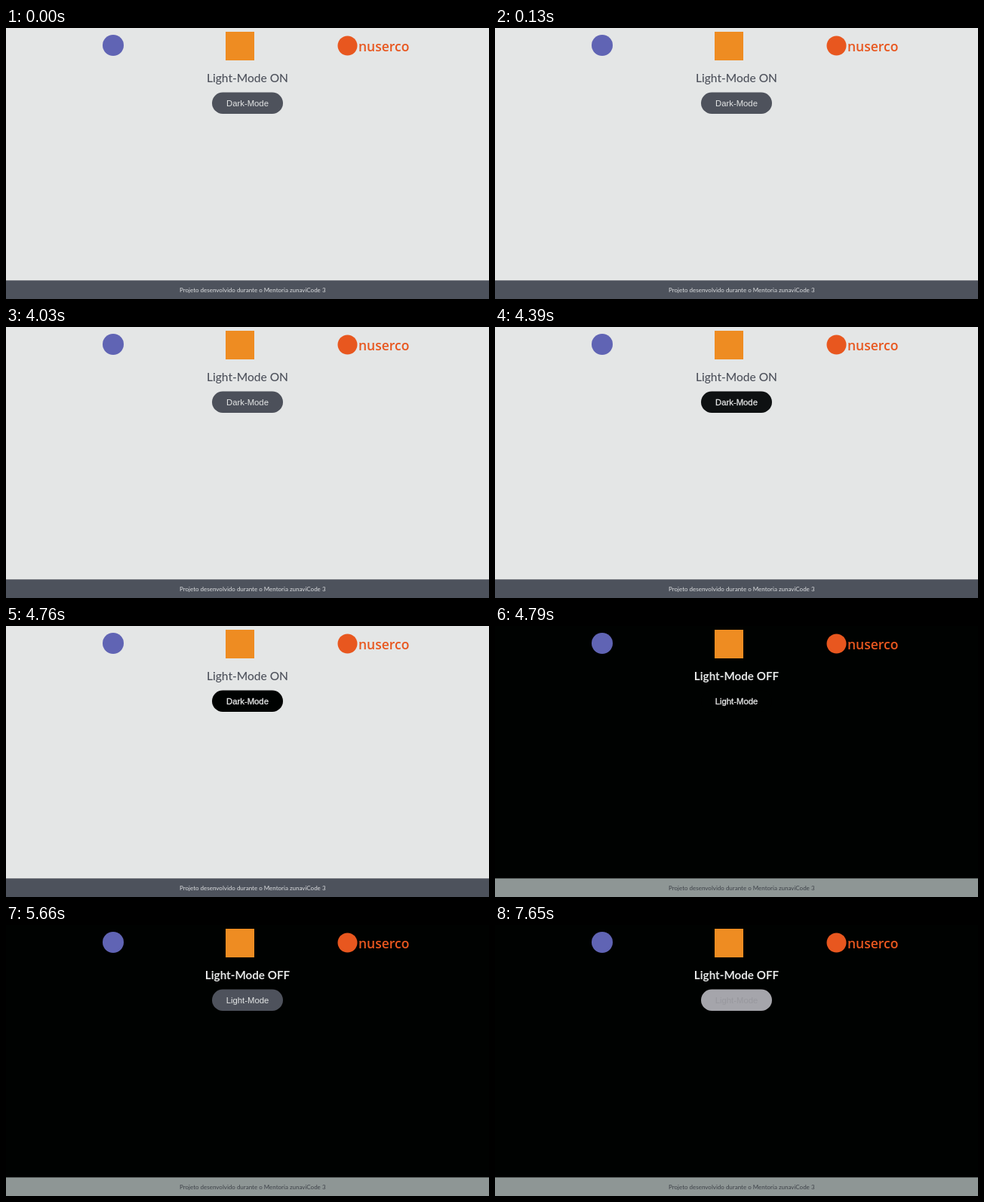
An HTML page for the animation above (8000 ms loop, 640 px wide and 360 px high).

```html
<!DOCTYPE html>
<html lang="pt-BR">
<head>
<meta charset="utf-8">
<title>Light and dark mode</title>
<style>
  html, body { margin: 0; width: 100%; height: 100%; overflow: hidden; }
  svg { display: block; width: 100%; height: 100%; }
  .title { font: 500 15.5px Lato, sans-serif; text-anchor: middle; }
  #dark .title { font-weight: 700; font-size: 15.2px; }
  .label { font: 11.3px "Liberation Sans", Arial, sans-serif; text-anchor: middle; fill: #e4e6e6; }
  #labels { stroke: #e4e6e6; }
  .note { font: 8px Lato, sans-serif; }
  .brand { font: 600 17.5px "Open Sans", sans-serif; fill: #e8571f; }
</style>
</head>
<body>
<svg viewBox="0 0 640 360">
  <rect id="page" width="640" height="360"/>

  <circle cx="142" cy="23" r="14" fill="#6064b4"/>
  <rect x="291" y="5" width="38" height="38" fill="#ee8c22"/>
  <circle cx="452.5" cy="23.5" r="13" fill="#e8571f"/>
  <text class="brand" x="467" y="31">nuserco</text>

  <g id="light">
    <text class="title" x="320" y="72" fill="#4d515b">Light-Mode ON</text>
  </g>
  <g id="dark">
    <text class="title" x="320" y="72" fill="#e4e6e6">Light-Mode OFF</text>
  </g>

  <rect id="button" x="273" y="85.5" width="94" height="28.5" rx="14.25"/>
  <g id="labels">
    <text class="label" id="lightLabel" x="320" y="104">Dark-Mode</text>
    <text class="label" id="darkLabel" x="320" y="104">Light-Mode</text>
  </g>

  <rect id="footer" y="335.3" width="640" height="24.7"/>
  <text class="note" id="note" x="230" y="350.7">Projeto desenvolvido durante o Mentoria zunaviCode 3</text>
</svg>
<script>
  const LOOP = 8000;
  const SWITCH = 4790;

  // Each step is [ms, value, easing]; without an easing the value holds until the next step.
  function play(id, property, steps) {
    const end = [LOOP, steps[steps.length - 1][1]];
    const frames = [...steps, end].map(([ms, value, easing = "step-end"]) =>
      ({ offset: ms / LOOP, [property]: value, easing }));
    document.getElementById(id).animate(frames, { duration: LOOP, iterations: Infinity });
  }

  const toggle = (id, property, before, after) =>
    play(id, property, [[0, before], [SWITCH, after]]);

  // Hovering fades the button in and out of its pressed look.
  const hover = (rest, pressed) => [
    [0, rest],
    [4000, rest, "ease"],
    [4760, pressed],
    [4860, pressed, "ease"],
    [5450, rest]
  ];

  toggle("page", "fill", "#e4e6e6", "#000201");
  toggle("footer", "fill", "#4d525c", "#8e9695");
  toggle("note", "fill", "#dcdee0", "#3e4249");
  for (const id of ["light", "lightLabel"]) toggle(id, "opacity", 1, 0);
  for (const id of ["dark", "darkLabel"]) toggle(id, "opacity", 0, 1);

  play("button", "fill", [...hover("#4e525c", "#000201"), [7650, "#a5a5ab"]]);
  play("labels", "strokeWidth", hover("0px", "0.35px"));
  play("darkLabel", "fill", [[0, "#e4e6e6"], [7650, "#98989e"]]);
</script>
</body>
</html>
```
